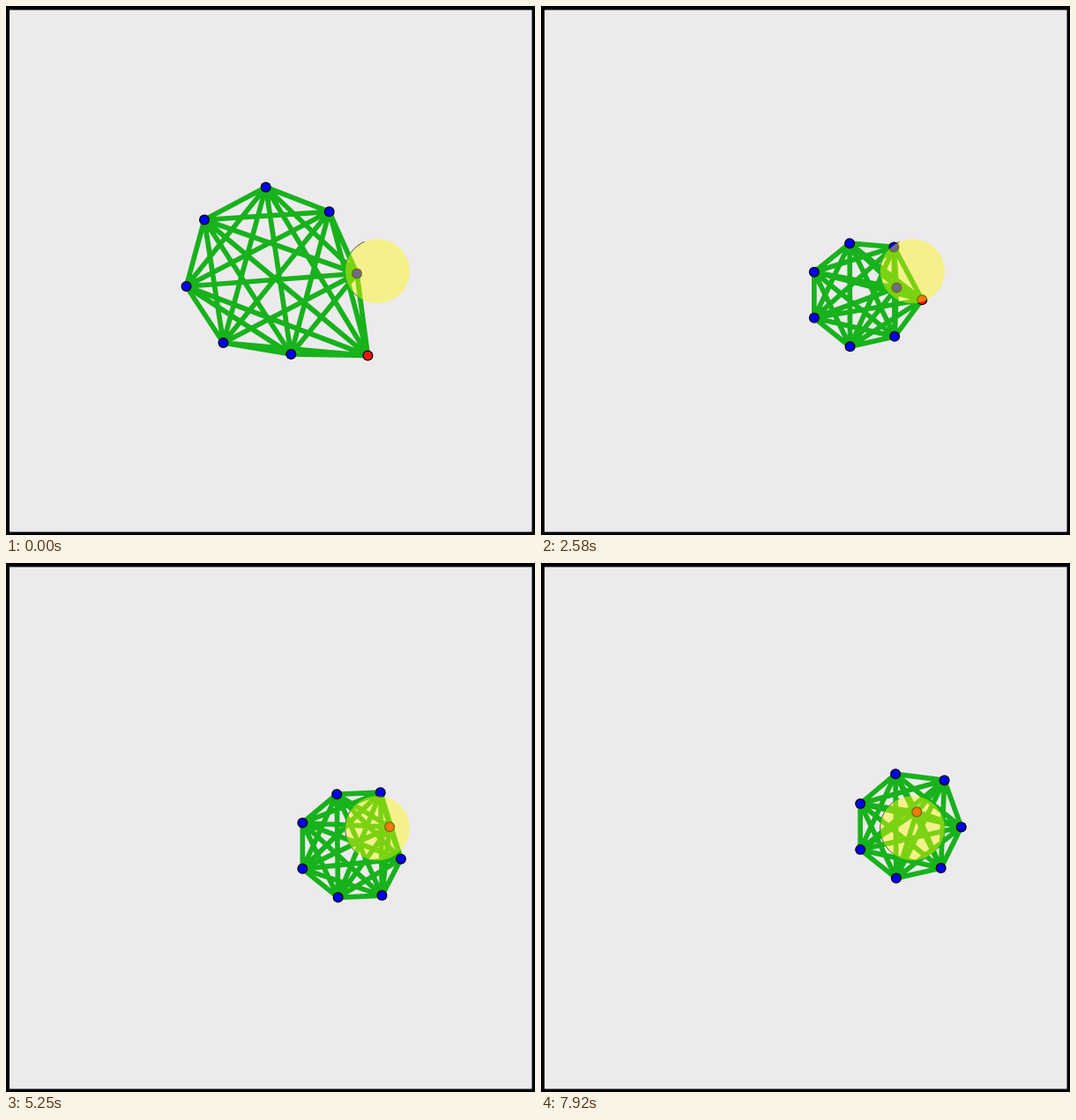
An HTML page with a canvas for the animation above (8000 ms loop, 600 by 600 pixels).

```html
<!DOCTYPE html>
<html>
<head>
<meta charset="utf-8">
<style>
  html, body { margin: 0; width: 100%; height: 100%; overflow: hidden; }
  canvas { display: block; }
</style>
</head>
<body>
<canvas id="stage" width="600" height="600"></canvas>
<script>
const ctx = document.getElementById('stage').getContext('2d');
const FPS = 12, STEPS = 96, SUBSTEPS = 4;

// Followers settle into a regular heptagon, chase the leader and keep their distance
const RADIUS = 60, SETTLE = 0.21, CHASE = 0.0268, REPEL = 1.7, MIN_GAP = 50.5;
const start = [[398, 303.5], [323.3, 395], [246.5, 382], [204.5, 318],
  [225, 242.5], [294.7, 205.5], [366.7, 233.3]];
const leaderPath = [[410.4, 396.5], [444.8, 312], [438.2, 295.7], [426.2, 282.3]];

function leaderAt(step) {
  const s = step / (STEPS - 1), r = 1 - s;
  const weights = [r ** 3, 3 * r * r * s, 3 * r * s * s, s ** 3];
  return [0, 1].map(k => weights.reduce((sum, w, i) => sum + w * leaderPath[i][k], 0));
}

const mean = (points, k) => points.reduce((sum, p) => sum + p[k], 0) / points.length;

function repulsion(p, others) {
  const push = [0, 0];
  for (const q of others) {
    const dx = p[0] - q[0], dy = p[1] - q[1], gap = Math.hypot(dx, dy);
    if (gap === 0 || gap >= MIN_GAP) continue;
    const strength = REPEL * (MIN_GAP - gap) / gap;
    push[0] += strength * dx;
    push[1] += strength * dy;
  }
  return push;
}

function advance(points, leader, dt) {
  const centre = [mean(points, 0), mean(points, 1)];
  return points.map((p, i) => {
    const angle = i * 2 * Math.PI / points.length;
    const slot = [RADIUS * Math.cos(angle), RADIUS * Math.sin(angle)];
    const push = repulsion(p, [...points, leader]);
    return p.map((v, k) => v + dt * (CHASE * (leader[k] - centre[k])
      + SETTLE * (centre[k] + slot[k] - v + push[k])));
  });
}

function simulate() {
  const poses = [];
  let points = start;
  for (let step = 0; step < STEPS; step++) {
    poses.push([...points, leaderAt(step)]);
    for (let j = 0; j < SUBSTEPS; j++) {
      points = advance(points, leaderAt(step + j / SUBSTEPS), 1 / SUBSTEPS);
    }
  }
  return poses;
}

function disc(x, y, r, fill) {
  ctx.beginPath();
  ctx.arc(x, y, r, 0, 2 * Math.PI);
  ctx.fillStyle = fill;
  ctx.fill();
}

function draw(nodes) {
  ctx.fillStyle = '#000';
  ctx.fillRect(0, 0, 600, 600);
  ctx.fillStyle = '#edeaed';
  ctx.fillRect(4, 4.5, 592.5, 592);

  // Thin shadow on the left rim of the yellow disc
  ctx.beginPath();
  ctx.arc(421, 300.7, 36.3, 0.7 * Math.PI, 1.37 * Math.PI);
  ctx.strokeStyle = '#333';
  ctx.lineWidth = 1;
  ctx.stroke();

  ctx.beginPath();
  nodes.forEach((p, i) => nodes.slice(i + 1).forEach(q => {
    ctx.moveTo(...p);
    ctx.lineTo(...q);
  }));
  ctx.strokeStyle = '#18b21c';
  ctx.lineWidth = 5.7;
  ctx.stroke();

  nodes.forEach(([x, y], i) => {
    disc(x, y, 6, '#000');
    disc(x, y, 4.8, i === nodes.length - 1 ? '#f01410' : '#0000e8');
  });
  disc(421.4, 300.7, 36.5, 'rgba(252, 250, 8, 0.43)');
}

const poses = simulate();

function tick() {
  draw(poses[Math.floor((performance.now() + 5) * FPS / 1000) % STEPS]);
  requestAnimationFrame(tick);
}
tick();
</script>
</body>
</html>
```
